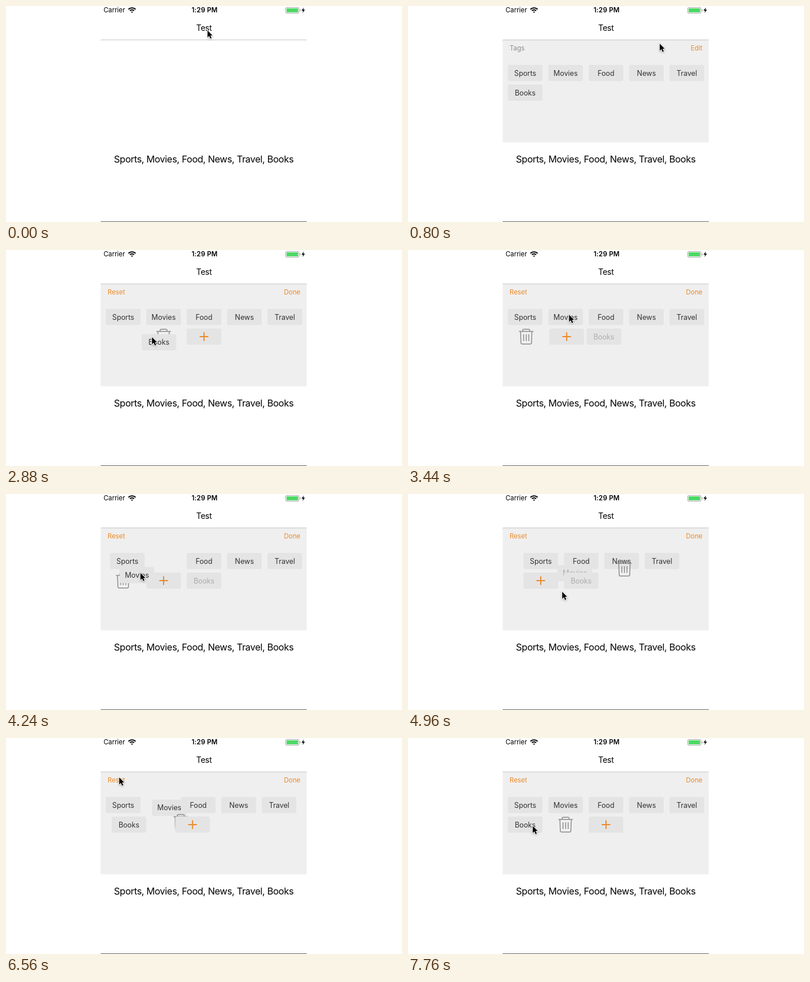
Animation, 686 px wide and 374 px high, one loop 8000 ms. Source, as an HTML page with a canvas:

```html
<!DOCTYPE html>
<html lang="en">
<head>
<meta charset="utf-8">
<title>Tag editor</title>
<style>
  html, body { margin: 0; width: 100%; height: 100%; overflow: hidden; background: #fff; }
  canvas { display: block; }
</style>
</head>
<body>
<canvas id="stage" width="686" height="374"></canvas>
<script>
const c = document.getElementById('stage').getContext('2d');
const LOOP = 8000, STEP = 80, MOVE = 300;
const OPEN = 450, EDIT = 1440, RESET = 6331;
const ORANGE = '#ea8a2c', GREY = '#8c8c8c';
const LEFT = 164, WIDTH = 357, MID = 343;

const tags = ['Sports', 'Movies', 'Food', 'News', 'Travel', 'Books'];
const start = [...tags, 'trash', 'plus'];
// Time each tag is picked up and dropped on the trash.
const drags = { Books: [2530, 3169], Movies: [3810, 4787] };

const shift = (names, name, i) => names.filter(n => n !== name).toSpliced(i, 0, name);
const layouts = [[0, start]];
const reorder = (at, name, i) => layouts.push([at, shift(layouts.at(-1)[1], name, i)]);
reorder(drags.Books[1], 'Books', 7);
reorder(4180, 'Movies', 0);
reorder(drags.Movies[1], 'Movies', 7);
layouts.push([RESET, start]);

// Pointer moves: start, end, x, y; it rests in between.
const moves = [
  [0, 0, 348, 41],
  [520, 800, 435, 64], [800, 1120, 499, 70],
  [1500, 2160, 190, 140], [2530, 2960, 266, 152],
  [3169, 3440, 278, 111], [3810, 4480, 206, 149],
  [4760, 4960, 266, 168], [4960, 5120, 272, 188], [5120, 5600, 209, 84],
  [5600, 6000, 195, 67], [7160, 7640, 215, 157], [7640, 7760, 215, 151],
];

const clamp = v => Math.max(0, Math.min(1, v));
const ease = v => (v = clamp(v), v * v * (3 - 2 * v));
const mix = (a, b, p) => a.map((v, i) => v + (b[i] - v) * p);
const during = (from, to, t) => t >= from && t < to;

const pointer = t => moves.reduce((pos, [from, to, ...end]) =>
  t < from ? pos : mix(pos, end, clamp((t - from) / (to - from || 1))), moves[0].slice(2));

const held = (name, t) => name in drags && during(...drags[name], t);
const disabled = (name, t) => name in drags && during(drags[name][1], RESET, t);

function slot(names, name) {
  const i = names.indexOf(name);
  return [203 + 70 * (i % 5), 116 + 34 * Math.floor(i / 5)];
}

function place(name, t) {
  if (held(name, t)) {
    const grab = drags[name][0], from = pointer(grab), now = pointer(t);
    return slot(start, name).map((v, i) => v + now[i] - from[i]);
  }
  const k = layouts.findLastIndex(l => l[0] <= t);
  const [at, names] = layouts[k], before = layouts[Math.max(0, k - 1)][1];
  return mix(slot(before, name), slot(names, name), ease((t - at) / MOVE));
}

// y is the middle of the capital letters.
function text(s, x, y, size, color, align = 'center', spacing = 0, weight = 400) {
  c.font = `${weight} ${size}px Inter, "Liberation Sans", sans-serif`;
  c.letterSpacing = spacing + 'px';
  c.textAlign = align;
  c.fillStyle = color;
  c.fillText(s, x, y + size * 0.364);
}

function box(x, y, w, h, r, color) {
  c.fillStyle = color;
  c.beginPath();
  c.roundRect(x, y, w, h, r);
  c.fill();
}

function stroke(d, color, width) {
  c.strokeStyle = color;
  c.lineWidth = width;
  c.stroke(new Path2D(d));
}

function statusBar() {
  text('Carrier', 169, 7.3, 11.4, '#000', 'left');
  text('1:29 PM', 344, 7.3, 11.4, '#000', 'center', 0.2, 600);
  c.strokeStyle = '#000';
  c.lineWidth = 2;
  for (const r of [1.6, 5.2, 8.8]) {
    c.beginPath();
    c.arc(218.3, 12, r, -Math.PI * 0.75, -Math.PI * 0.25);
    c.stroke();
  }
  box(484, 2, 24, 11, 3, '#a8a8a8');
  box(485, 3, 22, 9, 2, '#fff');
  box(486, 4, 20, 7, 1, '#4cd964');
  box(509, 5.5, 1.3, 4, 1, '#a8a8a8');
  c.fillStyle = '#000';
  c.fill(new Path2D('M516 2.5L512 8H514.6L513.6 12L518 6.4H515.2Z'));
}

function chip(x, y) {
  box(x - 30, y - 14, 60, 28, 3, '#e4e4e4');
}

function cell(name, t) {
  const [x, y] = place(name, t);
  if (tags.includes(name)) {
    chip(x, y);
    text(name, x, y, 12.4, disabled(name, t) ? '#adadad' : '#333', 'center', -0.05);
    return;
  }
  c.save();
  c.globalAlpha = clamp((t - EDIT + 60) / MOVE);
  c.translate(x, y);
  if (name === 'plus') {
    chip(0, 0);
    stroke('M-7.5 0H7.5M0 -7.5V7.5', ORANGE, 2);
  } else {
    stroke('M-12.5 -9H12.5M-6 -9V-11Q-6 -12.8 -4 -12.8H4Q6 -12.8 6 -11V-9' +
      'M-9.8 -9L-9.2 10.5Q-9 12.8 -7 12.8H7Q9 12.8 9.2 10.5L9.8 -9' +
      'M-4.5 -4V7.5M0 -4V7.5M4.5 -4V7.5', GREY, 1.5);
  }
  c.restore();
}

function panel(t) {
  c.save();
  c.beginPath();
  c.rect(LEFT, 59, WIDTH, 177 * ease((t - OPEN) / MOVE));
  c.clip();
  box(LEFT, 59, WIDTH, 177, 0, '#efefef');
  const editing = t >= EDIT;
  text(editing ? 'Reset' : 'Tags', 176, 73.3, 11.4, editing ? ORANGE : GREY, 'left');
  text(editing ? 'Done' : 'Edit', 510, 73.3, 11.4, ORANGE, 'right');
  // Movies lies lowest, a held tag on top.
  shift(start, 'Movies', 0)
    .sort((a, b) => held(a, t) - held(b, t))
    .forEach(name => cell(name, t));
  c.restore();
}

function arrow(t) {
  const [x, y] = pointer(t);
  const shape = new Path2D('M0.5 0.5V14L3.7 11.1L5.9 16.2L8.2 15.2L6 10.3H10Z');
  c.save();
  c.translate(x + 0.7, y + 0.8);
  c.scale(0.9, 0.9);
  c.shadowColor = 'rgba(0,0,0,.35)';
  c.shadowBlur = 3;
  c.shadowOffsetY = 1;
  c.strokeStyle = '#fff';
  c.lineWidth = 1.8;
  c.stroke(shape);
  c.shadowColor = 'transparent';
  c.fillStyle = '#000';
  c.fill(shape);
  c.restore();
}

function draw() {
  const t = Math.floor(performance.now() % LOOP / STEP) * STEP;
  box(0, 0, 686, 374, 0, '#fff');
  statusBar();
  text('Test', MID, 38, 14, '#000', 'center', -0.3);
  text(tags.join(', '), MID - 0.4, 264.8, 16.2, '#000', 'center', -0.38);
  panel(t);
  box(LEFT, 58.2, WIDTH, 1, 0, '#c4c4c4');
  box(LEFT, 373, WIDTH, 1, 0, '#666');
  arrow(t);
  requestAnimationFrame(draw);
}
draw();
</script>
</body>
</html>
```
